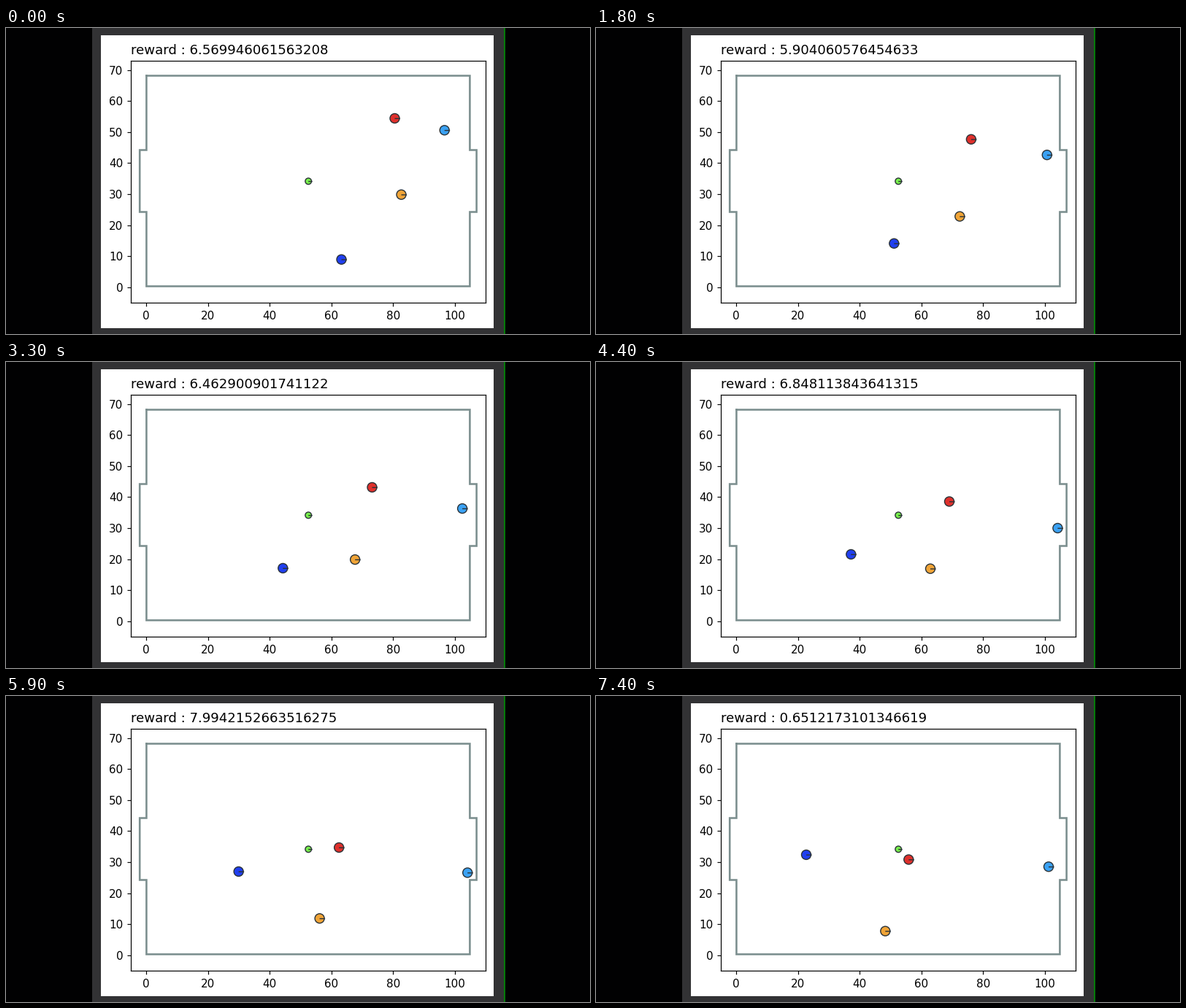
Write a matplotlib script that moves like this. It is 800x420 px and loops after 8000 ms.

```python
import numpy as np
import matplotlib.pyplot as plt
from matplotlib.animation import FuncAnimation
from matplotlib.patches import Circle, Rectangle

W, H, DPI = 800, 420, 100
PT = 72 / DPI  # points per pixel
INTERVAL, FRAMES = 100, 80
EDGE = "#2b3338"

plt.rcParams["font.family"] = "DejaVu Sans"

# Ticks at which the simulation advances one step
STARTS = np.cumsum([0, 5, 7, 6, 6, 7, 7, 6, 6, 9, 9, 6])

# Reward at key steps; the steps between take the mean of their neighbours
REWARD_STEPS = [0, 1, 3, 5, 7, 9, 11]
REWARDS = [6.569946061563208, 6.726525718321277, 5.904060576454633,
           6.462900901741122, 6.848113843641315, 7.9942152663516275,
           0.6512173101346619]

# Waypoints (step, x, y) in stage pixels, with straight runs between them
PATHS = {
    "#df302c": [(0, 532.5, 124), (5, 501.5, 172), (7, 484, 191.5),
                (11, 428.3, 224.5)],
    "#3ba2f4": [(0, 600.7, 140.3), (3, 617.8, 174.2), (7, 632.4, 228),
                (8, 641, 235), (9, 632.2, 242.5), (11, 620, 234.3)],
    "#f0a437": [(0, 541.5, 228.7), (3, 498.3, 258.6), (7, 458, 283.7),
                (9, 429.6, 305.3), (11, 396.3, 322.7)],
    "#203ff0": [(0, 459.5, 317.7), (1, 442.7, 313.6), (3, 408.3, 295.7),
                (5, 379.3, 283), (7, 349.3, 264), (11, 288, 217.9)],
}

fig = plt.figure(figsize=(W / DPI, H / DPI), dpi=DPI, facecolor="#010102")


def stage_axes(z):
    ax = fig.add_axes([0, 0, 1, 1], zorder=z)
    ax.set(xlim=(0, W), ylim=(H, 0))
    ax.axis("off")
    return ax


def box(ax, x0, y0, x1, y1, color):
    ax.add_patch(Rectangle((x0, y0), x1 - x0, y1 - y0, color=color, lw=0))


back = stage_axes(0)
box(back, 118, 0, 682, H, "#323234")
box(back, 682, 0, 684, H, "#047a08")
box(back, 130, 10, 668, 412, "white")

# Chart frame
L, R, T, B = 171, 657, 45, 377
chart = fig.add_axes([L / W, 1 - B / H, (R - L) / W, (B - T) / H], zorder=1)
chart.set(xlim=(-5, 110), ylim=(-5, 73),
          xticks=range(0, 101, 20), yticks=range(0, 71, 10))
chart.tick_params(length=5.2 * PT, width=1.2 * PT, pad=5.3 * PT,
                  labelsize=15.1 * PT)
for spine in chart.spines.values():
    spine.set_linewidth(1.2 * PT)

# Pitch outline with a goal on each side
front = stage_axes(2)
x0, x1, depth = 192.4, 635.4, 9.2
y0, y1, gy0, gy1 = 65.5, 354.5, 167.5, 252.5
gx0, gx1 = x0 - depth, x1 + depth
front.plot([x0, x1, x1, gx1, gx1, x1, x1, x0, x0, gx0, gx0, x0, x0],
           [y0, y0, gy0, gy0, gy1, gy1, y1, y1, gy1, gy1, gy0, gy0, y0],
           color="#7c8f8f", lw=2.6 * PT, solid_joinstyle="miter",
           solid_capstyle="projecting", snap=False)
title = front.text(171.2, 36.5, "", fontsize=18.1 * PT, va="baseline")


class Ball:
    def __init__(self, color, radius, reach):
        self.reach = reach
        self.disc = front.add_patch(Circle((0, 0), radius, fc=color, ec=EDGE,
                                           lw=1.4 * PT, zorder=3))
        self.tick, = front.plot([], [], color=EDGE, lw=1.4 * PT, zorder=4,
                                solid_capstyle="butt", snap=False)

    def move(self, x, y):
        self.disc.center = x, y
        self.tick.set_data([x, x + self.reach], [y + 0.3, y + 0.3])


Ball("#78f04c", 4.3, 5.5).move(414.2, 210.3)
balls = [(Ball(color, 6.5, 7.5), np.array(path).T)
         for color, path in PATHS.items()]


def update(i):
    step = int(np.searchsorted(STARTS, i, side="right")) - 1
    reward = float(np.interp(step, REWARD_STEPS, REWARDS))
    title.set_text(f"reward : {reward}")
    for ball, (s, x, y) in balls:
        ball.move(np.interp(step, s, x), np.interp(step, s, y))


anim = FuncAnimation(fig, update, frames=FRAMES, interval=INTERVAL,
                     init_func=lambda: update(0), repeat=True)
plt.show()
```
